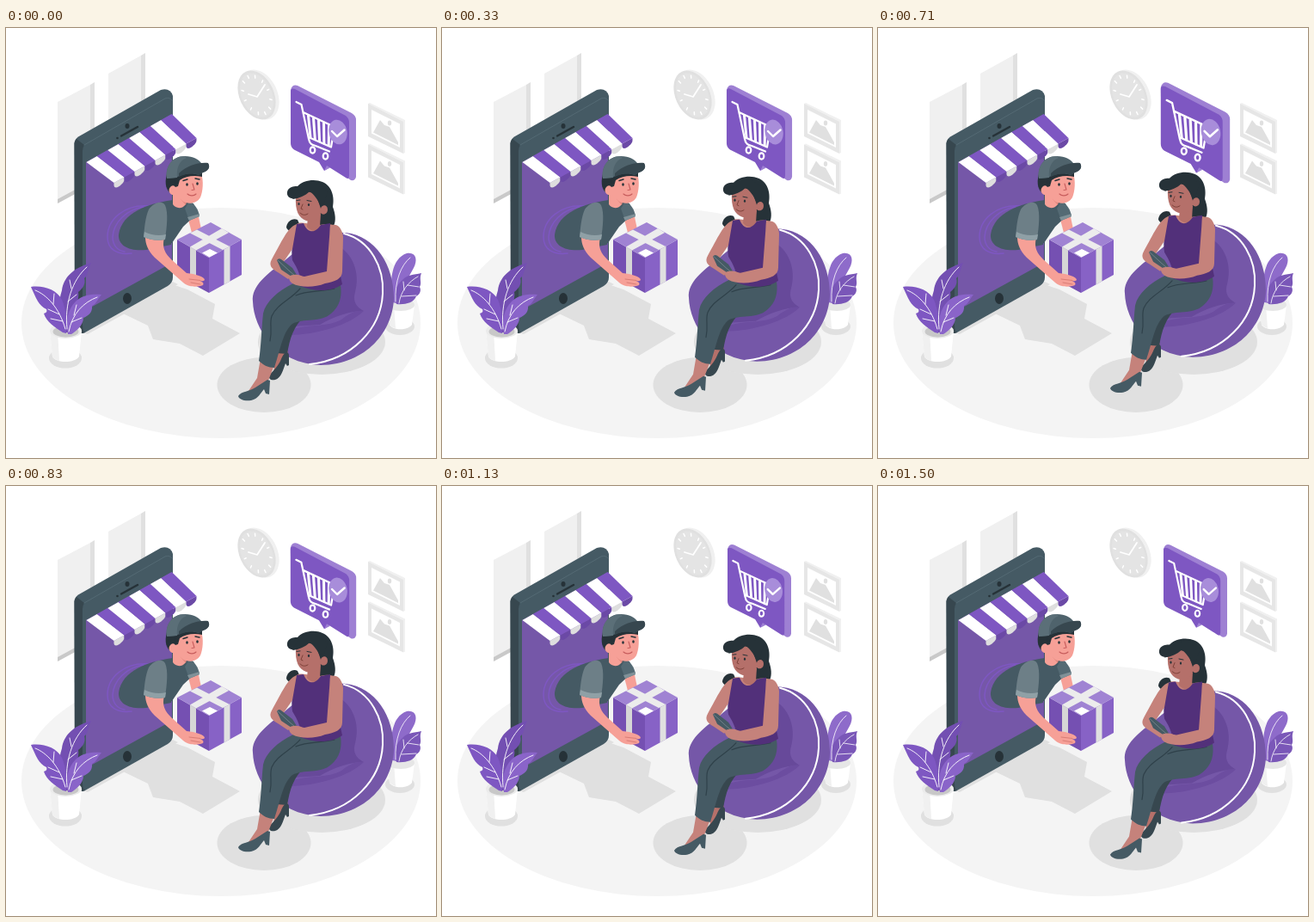
Recreate the animation shown at these times as an HTML page. Size 500x500 px, loop 1.54 s.

```html
<!DOCTYPE html>
<html lang="en">
<head>
<meta charset="utf-8">
<title>Online delivery</title>
<style>
html,body{margin:0;width:100%;height:100%;overflow:hidden;background:#fff}
svg{display:block;width:100vw;height:100vh}
.l{fill:none;stroke-linecap:round;stroke-linejoin:round}
.d{fill:#455a64}.dd{fill:#37474f}.k{fill:#263238}
.p{fill:#7e57c2}.pd{fill:#7557a8}.pl{fill:#9e80d3}
.g{fill:#e0e0e0}.gl{fill:#f0f0f0}.w{fill:#fff}
.s{fill:#f6a097}.f{fill:#c5827b}.fd{fill:#b5706a}
</style>
</head>
<body>
<svg viewBox="0 0 500 500">
<ellipse cx="250" cy="343" rx="232" ry="134" fill="#f4f4f4"/>

<g id="windows">
  <path class="gl" d="M60 86 98 66V182L60 202Z"/>
  <path class="g" d="M98 66 103 63V180H98Z"/>
  <path fill="#c9c9c9" d="M60 199 84 186V191L60 204Z"/>
  <path class="gl" d="M119 53 157 32V120H119Z"/>
  <path class="g" d="M157 32 162 29V120H157Z"/>
</g>

<g id="clock">
  <ellipse cx="295" cy="77.5" rx="20.5" ry="30.5" transform="rotate(-25 295 77.5)" class="gl"/>
  <ellipse cx="291.5" cy="78" rx="20" ry="30" transform="rotate(-25 291.5 78)" class="g"/>
  <ellipse cx="291.5" cy="78" rx="17.5" ry="27" transform="rotate(-25 291.5 78)" fill="#e4e4e4"/>
  <g id="ticks" class="l" stroke="#fff" stroke-width="1.5"/>
  <path class="l" stroke="#fff" stroke-width="1.8" d="M282 77 292 80 301 66"/>
</g>

<g id="frames">
  <g id="photo">
    <path class="gl" d="M421 88 423 87 464 107V145L462 146Z"/>
    <path fill="#e6e6e6" d="M421 88 462 109V146L421 126Z"/>
    <path class="w" d="M425 95 458 111.5V139L425 122.5Z"/>
    <path class="g" d="M427 121.5 435 107 440 113 446 115 456 133V136Z"/>
    <ellipse class="g" cx="446" cy="110.5" rx="2.2" ry="3"/>
  </g>
  <use href="#photo" y="47.5"/>
</g>

<g class="g">
  <path d="M136 332 196 299 211 304 243 321 240 338 272 355 229 381 202 367 171 362 165 346Z"/>
  <path d="M88 354 194 295 200 298 95 356Z"/>
  <ellipse cx="300" cy="415" rx="54.5" ry="32"/>
  <ellipse cx="367" cy="365" rx="74" ry="38"/>
  <ellipse cx="69" cy="384" rx="19" ry="11.5"/>
  <ellipse cx="458" cy="347" rx="17" ry="10"/>
</g>

<g id="phone">
  <path class="d" d="M79.500 134Q80 129 84 126.500L180 72Q191 69 194 79V290Q194 296 188 300L92 354Q84 357 80 350Z"/>
  <path class="dd" d="M79.500 134Q80 131 82 129L91 136Q89 139 89 143V346Q89 352 92 354 85 357 80 350Z"/>
  <path class="l" stroke="#546a74" d="M91 136 185 82Q190 80 193 84"/>
  <path class="pd" d="M93 156 193 100V273L93 328Z"/>
  <path class="l" stroke="#263238" stroke-width="2.4" d="M134 125.5 153 115"/>
  <ellipse class="k" cx="141" cy="114" rx="2.5" ry="3"/>
  <circle class="k" cx="129.5" cy="128" r="1.3"/>
  <ellipse class="k" cx="141" cy="314.5" rx="5" ry="6.5"/>
</g>

<g id="man">
  <path class="l" stroke="#7e57c2" stroke-width="1.5" d="M166 207C138 205 118 222 118 243 118 258 130 264 146 262M160 208C140 211 125 226 124 243 124 253 130 259 138 260"/>
  <path class="d" d="M194 200C166 204 135 214 131 240 130 253 143 260 163 258L192 252Z"/>
  <path class="s" d="M211 219 223 215 227 234 216 238Z"/>
  <path class="d" d="M184 206C194 200 210 200 218 204L222 216 206 231 193 250 178 252Z"/>
  <path fill="#546a74" d="M213 202C220 204 224 212 225 219L213 224 208 210Z"/>
  <path fill="#7f9198" d="M211 220 225 216V219L213 224Z"/>
  <path class="s" d="M194 190 210 198 209 205C205 211 197 210 194 205Z"/>
  <path fill="#e38980" d="M203 199 210 202 209 206Z"/>
  <path class="k" d="M187 170 200 168 199 187 193 193C186 190 184 180 187 170Z"/>
  <path class="s" d="M197 174C205 166 219 164 227 169 230 178 229 190 226 197 222 204 212 206 205 201L198 194C190 196 187 188 192 184 195 182 197 185 197 185Z"/>
  <path class="k" d="M196 171C206 165 219 164 228 168V173C219 171 209 172 202 177L200 184 197 185Z"/>
  <path fill="#4f636c" d="M187 175C185 160 194 149 208 149 218 149 224 153 227 157L235 158C238 162 235 166 229 168L224 171C214 167 203 171 198 174Z"/>
  <path fill="#5b6f78" d="M187 175C185 160 194 149 208 149L210 151C201 154 198 164 199 174Z"/>
  <path class="dd" d="M201 169C211 160 223 156 235 157 238 162 235 166 229 168L224 171C217 168 209 169 201 173Z"/>
  <g class="k"><ellipse cx="210.5" cy="182" rx="1.3" ry="1.8"/><ellipse cx="222.5" cy="181" rx="1.3" ry="1.8"/></g>
  <path class="l" stroke="#263238" stroke-width="1.4" d="M206 177.5 211 176M220 175 225 176"/>
  <path class="l" stroke="#c75d5d" stroke-width="1.1" d="M217 181 219 188 216 188.5M211 193C214 196 219 195 221 193"/>
</g>

<g id="awning"/>

<g id="box">
  <path fill="#7550b2" d="M199 246 236 267V308L199 288Z"/>
  <path fill="#8762c6" d="M236 267 274 246V287L236 308Z"/>
  <path fill="#a083d3" d="M199 246 238 226 274 246 236 267Z"/>
  <path fill="#ececec" d="M214 238.500 222 234.500 260 254 252 258ZM251 233 259 238 221 258.500 214 254.500Z"/>
  <path class="w" d="M228 261.5 237 257 246 261.5 236.5 266.5Z"/>
  <path fill="#d6d6d6" d="M214 254.500 221 258.500V299.500L214 296Z"/>
  <path class="g" d="M253.500 257.500 260.500 253.500V294.500L253.500 298.500Z"/>
</g>

<g id="arm">
  <path class="s" d="M162 243 184 244C181 255 185 262 192 269L210 285C220 286 231 289 231 293 230 295 225 294 222 294 227 294 231 296 229 299 222 302 211 301 206 296L173 267C165 259 162 251 162 243Z"/>
  <path class="l" stroke="#d97d76" d="M213 292 226 293.5M215 296 226 298"/>
  <path fill="#6d7f87" d="M166 211C172 203 181 200 185 206 189 215 187 231 185 246 176 248 167 246 160 243 161 232 162 220 166 211Z"/>
  <path fill="#8fa0a6" d="M161 237C169 241 178 242 186 240L185 246C176 248 167 246 160 243Z"/>
</g>

<g id="plantL">
  <path class="w" d="M51 352H88L85 382C80 390 58 390 54 382Z"/>
  <path class="gl" d="M51 352H60L62 387Q55 385 54 382Z"/>
  <ellipse cx="69.5" cy="352" rx="18.5" ry="9" fill="#ebebeb"/>
  <ellipse cx="69.5" cy="353" rx="15" ry="6.5" fill="#c8c8c8"/>
  <path fill="#734fb2" d="M69 354C61 336 60 320 65 305 67 290 78 279 99 273 95 281 96 287 91 291 93 298 89 303 84 307 86 315 79 330 74 354Z"/>
  <path class="p" d="M66 354C57 348 47 342 44 332 47 331 48 330 47 327 38 323 35 314 29 301 43 299 59 304 65 316 70 327 71 342 70 355Z"/>
  <path fill="#8a64c9" d="M72 356C69 340 72 327 81 318 88 311 98 309 111 310 106 316 105 321 100 323 101 331 95 335 90 337 90 346 81 353 76 356Z"/>
  <path class="l" stroke="#fff" stroke-width=".9" d="M69 350C62 325 47 310 34 305M71 350C68 320 77 293 94 278M73 353C77 332 90 319 106 313M55 321 56 309M62 333 49 327M66 341 52 338M72 318 82 310M76 303 74 293M79 334 82 322M76 342 88 337"/>
</g>

<g id="plantR">
  <path class="w" d="M443 322H475L472 345C467 352 450 352 446 345Z"/>
  <path class="gl" d="M443 322H451L453 349Q448 348 446 345Z"/>
  <ellipse cx="459" cy="322" rx="16" ry="7" fill="#e6e6e6"/>
  <path fill="#8e6bca" d="M449 319C446 294 448 268 466 262 477 260 479 270 474 279 468 290 460 301 459 321Z"/>
  <path fill="#7a57b8" d="M454 321C451 309 453 299 461 293 466 287 474 287 483 285 480 292 484 296 481 301 484 307 479 311 477 312 474 320 463 322 454 321Z"/>
  <path class="l" stroke="#fff" stroke-width=".8" d="M453 318C452 294 459 276 470 267M457 320C459 306 468 295 479 289M463 305 462 295M460 312 477 311M467 299 480 301"/>
</g>

<g id="sign">
  <path class="pl" d="M331 72Q333 65 339 67L402 99Q407 102 407 107V173Q406 178 401 177L332 130Z"/>
  <path class="p" d="M331 74Q331 69 336 71L395 102Q399 105 399 110V171Q399 177 395 174L376 162 370 166 364 156 335 141.500Q331 139 331 134Z"/>
  <path class="pl" d="M370 166 373 160 377 162.500Z"/>
  <g class="l" stroke="#fff" stroke-width="2.2">
    <path d="M337.500 86 343.5 89 352 129C353 135 356 136 360 137L376 143.500M345.500 98 382 115 378 138.500 352 127"/>
    <path id="bars" stroke-width="3"/>
    <ellipse cx="356.5" cy="142" rx="2.8" ry="3.6"/><ellipse cx="371.5" cy="149" rx="2.8" ry="3.6"/>
  </g>
  <ellipse cx="386" cy="121" rx="10.5" ry="14.5" transform="rotate(-12 386 121)" fill="#a88dda"/>
  <path class="l" stroke="#fff" stroke-width="2.4" d="M379 120 385 126 393.500 118.500"/>
</g>

<g id="woman">
  <path class="pd" d="M287 318C285 300 304 286 322 272 348 250 369 237 395 238 430 242 451 276 451 314 450 352 420 391 366 392 314 390 288 350 287 318Z"/>
  <path fill="#67499a" d="M385 253C404 262 412 286 406 307 402 321 411 326 416 329 399 329 380 336 365 345L334 347 386 301Z"/>
  <path fill="#6c4da0" d="M334 350C355 344 374 348 390 339 400 331 408 328 416 329 400 345 362 357 328 357Z"/>
  <path class="l" stroke="#fff" stroke-width="2" d="M393 239C424 247 440 279 438 309 436 350 402 386 353 391"/>

  <path class="fd" d="M314 376 328 376 322 390 311 402Z"/>
  <path class="dd" d="M306 404C311 398 316 394 320 385 323 377 328 375 329 380V392L327 393 325 390C322 398 320 407 313 409 308 410 305 408 306 404Z"/>
  <path class="dd" d="M324 332 348 334C334 347 330 361 327 379L314 378Z"/>
  <path class="f" d="M296 384 312 392 305 410 290 422 282 422 292 407Z"/>
  <path class="d" d="M270 428C274 422 283 423 290 418L304 409 307 410 306 426 302 425 300 420C296 424 294 431 285 433 277 434 271 432 270 428Z"/>
  <path class="d" d="M334 297C316 306 302 318 299 332 297 350 297 367 294 387 299 392 305 395 312 395 319 374 322 353 333 344 346 337 366 343 378 332 388 324 391 312 389 299Z"/>
  <path class="l" stroke="#2f414a" stroke-width="1.2" d="M342 303C331 316 315 321 309 335 306 344 310 350 307 364M337 311C350 305 367 307 382 303"/>

  <path class="k" d="M339 223C333 220 326 226 326 232 328 238 337 237 343 232Z"/>
  <path class="k" d="M337 198C328 200 325 193 328 188 331 184 336 184 339 184 345 177 359 175 368 179 380 184 382 198 380 208 383 216 384 224 381 230 373 235 361 231 358 226Z"/>
  <path class="f" d="M338 228C345 224 356 230 365 229 377 226 388 229 391 239L380 260 333 262Z"/>
  <path class="fd" d="M351 220 366 216 365 231C363 238 354 237 350 231Z"/>
  <path fill="#52307a" d="M338 228 346 227C350 238 359 240 366 229L377 227C376 241 378 258 385 270L391 298C377 308 357 306 342 300 344 289 339 280 333 270 331 258 334 242 338 228Z"/>
  <path class="fd" d="M337 196C343 190 353 188 361 195L366 210C367 205 374 205 374 211 374 217 368 218 366 215 364 224 356 226 349 224 340 221 336 212 337 196Z"/>
  <path class="k" d="M333 199C341 198 348 195 353 190 358 193 363 200 366 208L369 206 374 190 357 179 341 184Z"/>
  <g class="k"><ellipse cx="340.5" cy="204.500" rx="1.1" ry="1.6"/><ellipse cx="352" cy="205.5" rx="1.1" ry="1.6"/></g>
  <path class="l" stroke="#263238" d="M338 200.500 342 200M350 200.500 355 201.500"/>
  <path class="l" stroke="#7d4038" d="M345 205 343 210 345 211M342 215C345 218 348 218 351 216"/>

  <path class="f" d="M338 228C327 232 321 248 309 269 305 276 309 280 316 284L328 292 333 287 322 273 333 257Z"/>
  <path class="f" d="M377 230C385 226 391 233 392 243L391 283C391 292 382 295 371 297 359 302 342 302 333 297 328 293 327 287 334 287L347 289 373 283Z"/>
  <path class="d" d="M315 270Q317 267 320 269L333 279 338 287Q336 290 332 289L320 281Z"/>
  <path class="l" stroke="#718188" d="M316 270 330 283 336 288"/>
  <path class="f" d="M329 289C333 286 342 286 346 290L342 298 331 295Z"/>
</g>
</svg>
<script>
const $ = id => document.getElementById(id);
const NS = 'http://www.w3.org/2000/svg';

function path(parent, d, fill) {
  const el = document.createElementNS(NS, 'path');
  el.setAttribute('d', d);
  if (fill) el.setAttribute('fill', fill);
  $(parent).append(el);
}

// Striped awning with rounded ends
const high = i => [93.5 + 12.4 * i, 156 - 7 * i];
const low = i => [125.5 + 12 * i, 180 - 6.5 * i];
for (let i = 0; i < 8; i++) {
  const a = low(i), b = low(i + 1), drop = 7;
  path('awning', `M${a}L${b}v3C${b[0]} ${b[1] + drop} ${a[0] + 1} ${a[1] + drop + 3} ${a[0]} ${a[1] + 3}Z`,
    i % 2 ? '#6b49a6' : '#dedede');
  path('awning', `M${high(i)}L${high(i + 1)}L${b}L${a}Z`, i % 2 ? '#7e57c2' : '#fff');
}

// Clock ticks on the tilted dial
const tilt = -25 * Math.PI / 180;
const dial = (k, a) => {
  const x = 17 * k * Math.cos(a), y = 27 * k * Math.sin(a);
  return [291.5 + x * Math.cos(tilt) - y * Math.sin(tilt), 78 + x * Math.sin(tilt) + y * Math.cos(tilt)];
};
for (let i = 0; i < 12; i++) {
  const a = i * Math.PI / 6;
  path('ticks', `M${dial(.8, a)}L${dial(.92, a)}`);
}

// Cart bars
let bars = '';
for (let i = 0; i < 5; i++) bars += `M${351.5 + i * 6} ${102 + i * 2.8}L${354 + i * 5.3} ${127 + i * 2.4}`;
$('bars').setAttribute('d', bars);

const LOOP = 1540, STEPS = 37, STEP_MS = 1000 / 24;
const BEAT = [[0, 1], [.1, 1.1], [.3, 1], [.4, 1], [.5, 1.1], [.6, 1], [1, 1]];
const FLOAT = [[0, 0], [.5, -10], [1, 0]];

function at(keys, p) {
  const i = Math.max(1, keys.findIndex(k => k[0] >= p));
  const [p0, v0] = keys[i - 1], [p1, v1] = keys[i];
  return v0 + (v1 - v0) * (p - p0) / (p1 - p0);
}

// The artwork is drawn in its pose at the first step
const y0 = at(FLOAT, 1 / STEPS), s0 = at(BEAT, 1 / STEPS);

function draw(ms) {
  const step = Math.min(STEPS, 1 + Math.floor((ms % LOOP + 5) / STEP_MS));
  const p = step / STEPS;
  $('woman').setAttribute('transform', `translate(0 ${at(FLOAT, p) - y0})`);
  $('sign').setAttribute('transform', `translate(369 122) scale(${at(BEAT, p) / s0}) translate(-369 -122)`);
}

const start = performance.now();
function tick() {
  draw(performance.now() - start);
  requestAnimationFrame(tick);
}
draw(0);
requestAnimationFrame(tick);
</script>
</body>
</html>
```
